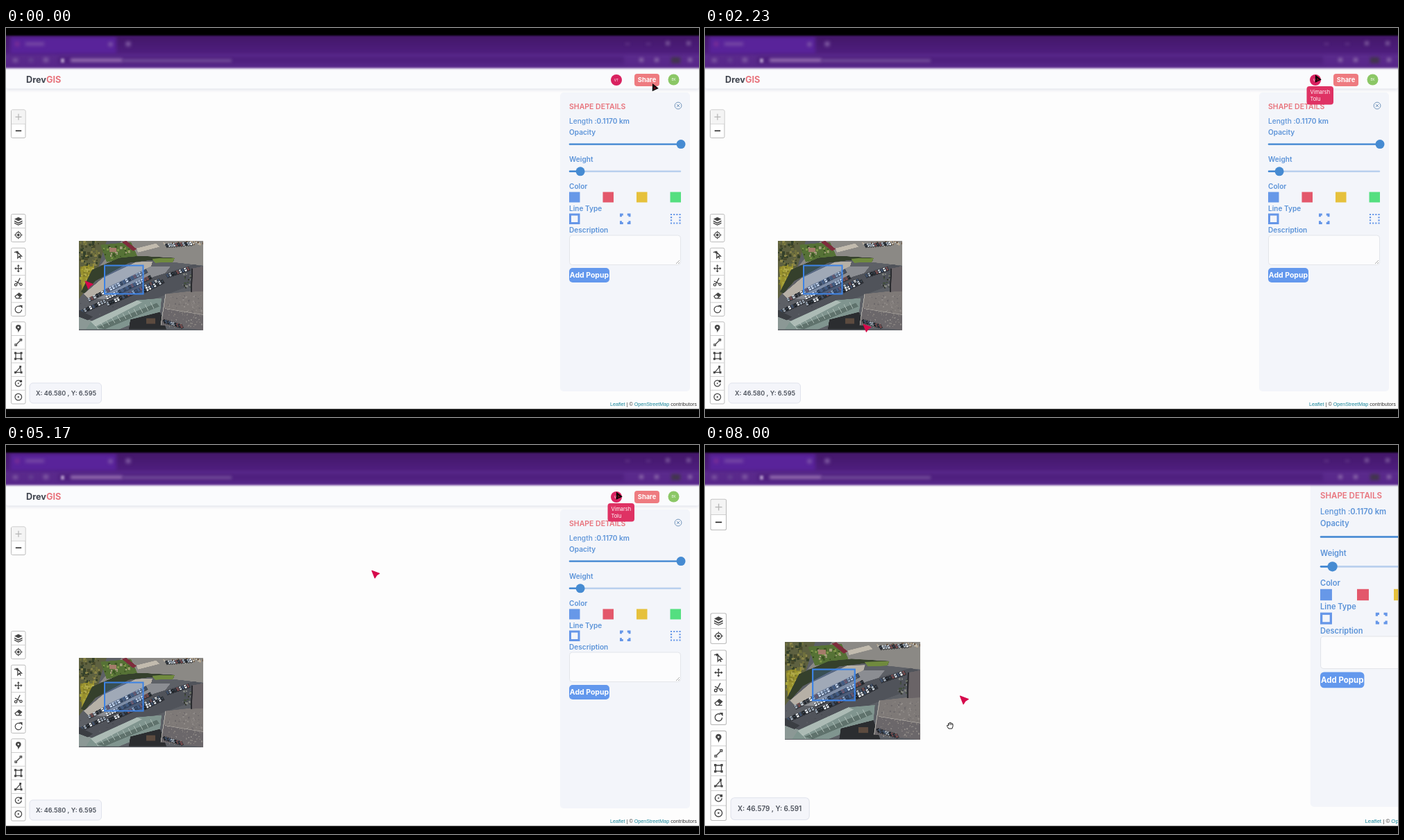
Recreate the animation shown at these times as an HTML page with a canvas. Size 998 px wide and 561 px high, loop 8.03 s.

```html
<!DOCTYPE html>
<html lang="en">
<head>
<meta charset="utf-8">
<title>Shared map</title>
<style>
html, body { margin: 0; width: 100%; height: 100%; overflow: hidden; background: #000; }
canvas { display: block; width: 998px; height: 561px; }
</style>
</head>
<body>
<canvas id="stage" width="998" height="561"></canvas>
<script>
const W = 998, H = 561, LOOP = 8030;
const ZOOM_AT = 6850, ZOOM = 1.0925, ZOOM_Y = -50.6;
const SANS = 'Inter, sans-serif', ARIAL = '"Liberation Sans", Arial, sans-serif';
const BLUE = '#5b93d8', ICON = '#464646';
const ctx = document.getElementById('stage').getContext('2d');

// time, x, y in page units
const remotePath = [
  [0, 119, 370], [1530, 321, 392], [2930, 171, 440], [4230, 568, 209],
  [6200, 409, 229], [7100, 332.5, 404], [8030, 341.5, 381.5]
];
// time, x, y of the pointer tip on the stage
const localPath = [
  [0, 931, 80], [250, 931, 80], [800, 879, 67.5], [5350, 879, 67.5],
  [5900, 913, 140.5], [7200, 913, 140.5], [7850, 353, 404.5], [8030, 353, 404.5]
];

function box(g, x, y, w, h, r, fill, stroke) {
  g.beginPath();
  g.roundRect(x, y, w, h, r);
  if (fill) { g.fillStyle = fill; g.fill(); }
  if (stroke) { g.strokeStyle = stroke; g.lineWidth = 1; g.stroke(); }
}
function disc(g, x, y, r, fill) {
  g.beginPath();
  g.arc(x, y, r, 0, Math.PI * 2);
  g.fillStyle = fill;
  g.fill();
}
function poly(g, fill, ...p) {
  g.beginPath();
  for (let i = 0; i < p.length; i += 2) g.lineTo(p[i], p[i + 1]);
  g.closePath();
  g.fillStyle = fill;
  g.fill();
}
function line(g, x1, y1, x2, y2, color, width) {
  g.beginPath();
  g.moveTo(x1, y1);
  g.lineTo(x2, y2);
  g.strokeStyle = color;
  g.lineWidth = width;
  g.stroke();
}
function text(str, x, y, size, weight, color, family = SANS, align = 'left') {
  ctx.font = `${weight} ${size}px ${family}`;
  ctx.textAlign = align;
  ctx.textBaseline = 'alphabetic';
  ctx.fillStyle = color;
  ctx.fillText(str, x, y);
  return x + ctx.measureText(str).width;
}
function layer(w, h, scale, paint) {
  const c = document.createElement('canvas');
  c.width = w * scale;
  c.height = h * scale;
  const g = c.getContext('2d');
  g.scale(scale, scale);
  paint(g);
  return c;
}
function random(seed) {
  return () => (seed = (seed * 16807) % 2147483647) / 2147483647;
}

// blurred browser bar
const bar = layer(W, 70, 1, g => {
  const rect = (x, y, w, h, c, blur) => {
    g.filter = `blur(${blur}px)`;
    g.fillStyle = c;
    g.fillRect(x, y, w, h);
  };
  const shade = g.createLinearGradient(0, 11, 0, 58);
  shade.addColorStop(0, '#431769');
  shade.addColorStop(.5, '#4d1d7c');
  shade.addColorStop(.62, '#5a2a8c');
  shade.addColorStop(1, '#572689');
  rect(-20, 0, W + 40, 58, shade, 1.6);
  rect(6, 13, 153, 24, '#59239a', 2.5);
  rect(75, 41, 815, 11, '#4f207f', 2.5);
  const soft = '#8d6aae';
  rect(28, 21, 27, 4, '#7d52a8', 2.5);
  rect(13, 20, 6, 6, '#7d3096', 2.5);
  rect(148, 21, 5, 5, soft, 2.5);
  rect(173, 20, 6, 6, soft, 2.5);
  rect(10, 44, 7, 5, '#8460a6', 2.5);
  rect(33, 44, 6, 5, '#6a4695', 2.5);
  rect(54, 43, 7, 6, '#8460a6', 2.5);
  rect(79, 44, 5, 6, '#ac90c4', 1.8);
  rect(93, 44, 75, 5, '#946fb0', 2.3);
  rect(168, 45, 157, 4, '#75509a', 2.3);
  for (const x of [892, 922]) rect(x, 22, 6, 2, '#6b4590', 2);
  for (const x of [950, 980]) rect(x, 19, 6, 6, '#785499', 2.3);
  for (const x of [912, 934, 982]) rect(x, 43, 6, 6, '#8763a6', 2.3);
  rect(958, 42, 13, 9, '#42354e', 2.3);
  rect(-20, -20, W + 40, 31, '#000', 1);
});

// aerial view, 179 by 129 units
const aerial = layer(179, 129, 3, g => {
  const rnd = random(77);
  const speck = (n, x, y, w, h, colors, size) => {
    for (let i = 0; i < n; i++) {
      g.fillStyle = colors[Math.floor(rnd() * colors.length)];
      const s = size * (.5 + rnd());
      g.fillRect(x + rnd() * w, y + rnd() * h, s, s);
    }
  };
  const cars = (x1, y1, x2, y2, n) => {
    const tones = ['#eef1f4', '#2b2f36', '#a3adb8', '#40506a', '#ccd3da', '#1d2126', '#7d4a4a'];
    for (let i = 0; i < n; i++) {
      const k = (i + .5) / n;
      g.save();
      g.translate(x1 + (x2 - x1) * k, y1 + (y2 - y1) * k);
      g.rotate(-.5);
      g.fillStyle = 'rgba(25,28,33,.6)';
      g.fillRect(-2, -2.6, 4.1, 6.2);
      g.fillStyle = tones[Math.floor(rnd() * tones.length)];
      g.fillRect(-1.5, -2.6, 2.8, 5);
      g.fillStyle = '#465361';
      g.fillRect(-1, -1, 1.9, 1.2);
      g.restore();
    }
  };
  g.fillStyle = '#5d6066';
  g.fillRect(0, 0, 179, 129);
  poly(g, '#8b8985', 62, 0, 179, 0, 179, 36, 135, 31, 90, 25, 30, 36);
  poly(g, '#5e6140', 0, 0, 40, 0, 28, 38, 14, 66, 0, 84);
  poly(g, '#9a922e', 2, 38, 24, 32, 16, 55, 4, 72);
  speck(60, 0, 0, 29, 33, ['#34402a', '#6f703d', '#8b8548', '#484a2c'], 3.2);
  speck(45, 1, 36, 17, 27, ['#a6a33a', '#837d2a', '#b3ab4c'], 2.8);
  poly(g, '#567236', 31, 6, 75, 2, 84, 22, 40, 31);
  speck(35, 34, 7, 40, 17, ['#3d5425', '#7f9548', '#a89f80', '#34461f'], 2.5);
  box(g, 44, 10, 10, 6, 0, '#a47c6a');
  poly(g, '#7e2c3c', 62, 2, 68, 0, 83, 12, 78, 15);
  poly(g, '#c2bbae', 83, 11, 111, 4, 116, 9, 85, 17);
  speck(22, 120, 0, 58, 5, ['#b3a48f', '#6d5a48', '#57613f', '#c9c2b4'], 2.6);
  poly(g, '#35402c', 19, 42, 58, 25, 88, 22, 138, 25, 136, 30, 104, 28, 72, 32, 24, 58, 8, 76, 3, 74);
  poly(g, '#708a3e', 105, 26, 138, 25, 135, 31, 110, 32);
  poly(g, '#b6b0a6', 7, 77, 34, 54, 82, 31, 106, 30, 104, 37, 44, 66, 14, 84);
  poly(g, '#8b8d92', 14, 84, 44, 66, 104, 37, 132, 37, 121, 51, 50, 84, 30, 84);
  poly(g, '#50535a', 0, 104, 108, 52, 166, 34, 179, 38, 179, 58, 93, 90, 0, 128);
  speck(90, 0, 90, 118, 30, ['#5a5d63', '#474a50'], 1.4);
  cars(13, 86, 98, 43, 22);
  cars(39, 83, 104, 52, 18);
  cars(40, 92, 117, 57, 21);
  cars(126, 51, 159, 40, 9);
  cars(3, 103, 39, 87, 9);
  cars(93, 73, 122, 58, 8);
  cars(125, 7, 163, 4, 11);
  poly(g, '#8b9895', 0, 109, 22, 117, 18, 128, 0, 128);
  poly(g, '#3b3e43', 0, 100, 20, 110, 13, 115, 0, 110);
  poly(g, '#80958f', 10, 128, 18, 116, 84, 86, 119, 83, 117, 104, 58, 128);
  poly(g, '#acbbb5', 17, 117, 84, 86, 91, 89, 24, 124);
  poly(g, '#5f726c', 26, 125, 112, 90, 116, 95, 37, 128);
  for (let i = 0; i < 11; i++) line(g, 23 + i * 8, 121 - i * 3.2, 28 + i * 8, 128 - i * 3, '#b8c6bf', .7);
  poly(g, '#2b2d30', 74, 114, 117, 103, 126, 128, 72, 128);
  box(g, 97, 112, 13, 8, 0, '#5c4b3f');
  poly(g, '#7e7977', 125, 77, 179, 71, 179, 129, 118, 122);
  poly(g, '#6b676a', 122, 97, 179, 107, 179, 129, 118, 122);
  speck(180, 126, 78, 51, 46, ['#918c89', '#6c686a', '#837e7b'], 1.4);
  line(g, 124, 98, 179, 107, '#a5a09b', .8);
  line(g, 125, 77, 118, 122, '#b2afa9', 1);
  cars(122, 116, 149, 124, 10);
  poly(g, '#6a6467', 163, 40, 179, 37, 179, 73, 162, 74);
  line(g, 163, 40, 162, 74, '#292a2e', 2);
  speck(25, 149, 47, 12, 20, ['#434f3e', '#80837e', '#33372f'], 2);
});

const icons = {
  layers: ['', 'M0-6L6-3L0 0L-6-3ZM-6-1L0 2L6-1L6 .8L0 3.8L-6 .8ZM-6 2.2L0 5L6 2.2L6 3.6L0 6.4L-6 3.6Z'],
  locate: ['M4 0A4 4 0 1 1-4 0A4 4 0 1 1 4 0M0-6V-4M0 6V4M-6 0H-4M6 0H4', 'M2 0A2 2 0 1 1-2 0A2 2 0 1 1 2 0'],
  edit: ['M-6-3.6Q-1-6-.5-1M-1-4V5L1.5 2.2H5ZM2 2.5L3.5 5.8', 'M-3.5-5.6H-.3V-2.4H-3.5Z'],
  move: ['M-5 0H5M0-5V5', 'M-6 0L-3.5-2V2ZM6 0L3.5-2V2ZM0-6L-2-3.5H2ZM0 6L-2 3.5H2Z'],
  cut: ['M-2 2.5L2.5-6M2.3 2.5L-5-1.5M-2 4A1.8 1.8 0 1 1-5.6 4A1.8 1.8 0 1 1-2 4M5.6 3.5A1.7 1.7 0 1 1 2.2 3.5A1.7 1.7 0 1 1 5.6 3.5', ''],
  erase: ['M-5 1L1-4L5-1L0 4H-3ZM0 4H5', 'M-2-1L1-4L5-1L2 2Z'],
  turn: ['M2.5-4A4.9 4.9 0 1 0 5 .5', 'M1-6.2H6V-1.2Z'],
  pin: ['', 'M0 6C-1-1-4 1-4-2A4 4 0 1 1 4-2C4 1 1 2 0 6ZM1.3-2A1.3 1.3 0 1 0-1.3-2A1.3 1.3 0 1 0 1.3-2Z'],
  line: ['M-3 3L3-3M-5 2.5H-2.5V5H-5ZM2.5-5H5V-2.5H2.5Z', ''],
  rect: ['M-4-4H4V4H-4Z', 'M-6-6H-2.8V-2.8H-6ZM6-6H2.8V-2.8H6ZM-6 6H-2.8V2.8H-6ZM6 6H2.8V2.8H6Z'],
  poly: ['M-4 4L3-4L4 4Z', 'M-6 2.6H-3V5.6H-6ZM1.5-6H4.5V-3H1.5ZM3 2.6H6V5.6H3Z'],
  ring: ['M3.5-3A4.6 4.6 0 1 0 4.6 0', 'M2-5H5.5V-1.5H2ZM1 0A1 1 0 1 0-1 0A1 1 0 1 0 1 0'],
  circle: ['M5 0A5 5 0 1 1-5 0A5 5 0 1 1 5 0', 'M1.2 0A1.2 1.2 0 1 1-1.2 0A1.2 1.2 0 1 1 1.2 0']
};
for (const k in icons) icons[k] = icons[k].map(d => new Path2D(d));

function icon(name, x, y) {
  const [stroke, fill] = icons[name];
  ctx.save();
  ctx.translate(x, y);
  ctx.scale(.96, .96);
  ctx.strokeStyle = ctx.fillStyle = ICON;
  ctx.lineWidth = 1.3;
  ctx.stroke(stroke);
  ctx.fill(fill, 'evenodd');
  ctx.restore();
}

function tools(y, h, names) {
  box(ctx, 7.5, y, 20.5, h, 2, '#fff', '#bcbcbc');
  const step = h / names.length;
  names.forEach((n, i) => {
    if (i) line(ctx, 8, y + step * i, 27.5, y + step * i, '#cfcfcf', 1);
    if (icons[n]) icon(n, 17.8, y + step * (i + .5));
  });
}

function slider(y, value) {
  const x = 811 + 161 * value;
  ctx.lineCap = 'round';
  line(ctx, 812, y, 971, y, '#b9d0ee', 2.4);
  line(ctx, 812, y, x, y, '#4589d3', 2.4);
  ctx.lineCap = 'butt';
  disc(ctx, x, y, 6.5, '#468bd2');
}

function frameIcon(x, dash, offset) {
  ctx.save();
  ctx.setLineDash(dash);
  ctx.lineDashOffset = offset;
  ctx.strokeStyle = '#6596e8';
  ctx.lineWidth = dash.length && dash[0] < 3 ? 2.2 : 3;
  ctx.strokeRect(x + 1.5, 269, 12.5, 12.5);
  ctx.restore();
}

function panel() {
  box(ctx, 798, 93, 187, 431, 5, '#f3f5fa');
  text('SHAPE DETAILS', 811, 117, 10.5, 600, '#e8737c');
  ctx.beginPath();
  ctx.arc(968, 112, 4.9, 0, 7);
  ctx.strokeStyle = '#7698bd';
  ctx.lineWidth = 1;
  ctx.stroke();
  line(ctx, 966, 110, 970, 114, '#7698bd', 1);
  line(ctx, 970, 110, 966, 114, '#7698bd', 1);
  const x = text('Length :', 811, 138, 10.2, 500, BLUE);
  text('0.1170 km', x, 138, 10.2, 600, BLUE);
  const labels = [['Opacity', 153.5], ['Weight', 193], ['Color', 232], ['Line Type', 263.5], ['Description', 295]];
  for (const [s, y] of labels) text(s, 811, y, 10.1, 600, BLUE);
  slider(167.6, 1);
  slider(206.8, .1);
  ['#6798e8', '#e3586b', '#e6c13c', '#54df80'].forEach((c, i) => {
    ctx.fillStyle = c;
    ctx.fillRect(811 + i * 48.5, 236.5, 15.5, 15);
  });
  frameIcon(811, [], 0);
  frameIcon(884, [6.5, 6], 3.25);
  frameIcon(956.5, [2.1, 2.07], 1.05);
  box(ctx, 811.5, 299, 160, 42.5, 4, '#fcfcfd', '#e3e5ea');
  line(ctx, 965, 340, 970, 335, '#999', .8);
  line(ctx, 968, 340, 970, 338, '#999', .8);
  box(ctx, 811, 346, 58, 21, 5, '#6398ed');
  text('Add Popup', 840, 360.2, 10.5, 700, '#fff', SANS, 'center');
}

function header(hover) {
  ctx.save();
  ctx.shadowColor = 'rgba(80,90,150,.22)';
  ctx.shadowBlur = 5;
  ctx.shadowOffsetY = 1;
  box(ctx, 0, 50, W, 37.5, 3, '#fafbfd');
  ctx.restore();
  const x = text('Drev', 29, 79, 12.7, 700, '#40454f');
  text('GIS', x, 79, 12.7, 700, '#e8737c');
  disc(ctx, 879, 75, 8, '#d92260');
  text('VT', 879, 76.8, 4.8, 400, '#fff', SANS, 'center');
  box(ctx, 905, 66, 36, 18, 4, '#ee7b80');
  text('Share', 923, 78.2, 9.3, 700, '#fff', SANS, 'center');
  disc(ctx, 961.5, 74.5, 8, '#8bc766');
  text('EK', 961.5, 76.3, 4.8, 400, '#fff', SANS, 'center');
  if (hover) {
    box(ctx, 866.5, 84, 38.5, 26.5, 4, '#df3264');
    text('Vimarsh', 871.5, 95, 7.4, 400, '#fff');
    text('Tolu', 871.5, 105.2, 7.4, 400, '#fff');
  }
}

function page(hover, coords) {
  ctx.fillStyle = '#fdfdfd';
  ctx.fillRect(0, 0, W, H);
  ctx.drawImage(aerial, 105, 306.7, 179, 128.8);
  ctx.fillStyle = 'rgba(70,140,250,.2)';
  ctx.fillRect(142, 342.5, 55.5, 41);
  ctx.strokeStyle = '#3c83e6';
  ctx.lineWidth = 2;
  ctx.strokeRect(142, 342.5, 55.5, 41);

  tools(118, 40.5, ['plus', 'minus']);
  ctx.fillStyle = '#f4f4f4';
  ctx.fillRect(8, 118.5, 19.5, 19.2);
  line(ctx, 13.5, 128.3, 22.5, 128.3, '#b8b8b8', 1.3);
  line(ctx, 18, 123.8, 18, 132.8, '#b8b8b8', 1.3);
  line(ctx, 13.8, 148.3, 22.2, 148.3, '#222', 1.5);
  tools(268.5, 40, ['layers', 'locate']);
  tools(317.3, 98.2, ['edit', 'move', 'cut', 'erase', 'turn']);
  tools(423.8, 118.2, ['pin', 'line', 'rect', 'poly', 'ring', 'circle']);

  box(ctx, 34, 512, 103.5, 29, 5, '#f4f5fa', '#e0e3ec');
  text(coords, 43, 529.8, 9.05, 600, '#4b505a');
  panel();
  let x = text('Leaflet', 870, 545.4, 7.18, 400, '#16859a', ARIAL);
  x = text(' | © ', x, 545.4, 7.18, 400, '#333', ARIAL);
  x = text('OpenStreetMap', x, 545.4, 7.18, 400, '#16859a', ARIAL);
  text(' contributors', x, 545.4, 7.18, 400, '#333', ARIAL);
  header(hover);
}

function segment(path, t) {
  let i = 0;
  while (i < path.length - 2 && t >= path[i + 1][0]) i++;
  return i;
}
function eased(path, t) {
  const i = segment(path, t), a = path[i], b = path[i + 1];
  const k = (t - a[0]) / (b[0] - a[0]), e = k * k * (3 - 2 * k);
  return [1, 2].map(n => a[n] + (b[n] - a[n]) * e);
}
function curved(path, t) {
  const i = segment(path, t), a = path[i], b = path[i + 1];
  const p = path[i - 1] || a, q = path[i + 2] || b;
  const d = b[0] - a[0], k = (t - a[0]) / d, k2 = k * k, k3 = k2 * k;
  return [1, 2].map(n => {
    const ma = (b[n] - p[n]) / (b[0] - p[0]) * d;
    const mb = (q[n] - a[n]) / (q[0] - a[0]) * d;
    return (2 * k3 - 3 * k2 + 1) * a[n] + (k3 - 2 * k2 + k) * ma + (3 * k2 - 2 * k3) * b[n] + (k3 - k2) * mb;
  });
}

function remotePointer([x, y]) {
  poly(ctx, '#d60a4c', x - 4.8, y - 4.6, x + 6, y - .5, x + 2, y + 2, x - .6, y + 6);
  ctx.strokeStyle = '#d60a4c';
  ctx.lineWidth = 1.2;
  ctx.lineJoin = 'round';
  ctx.stroke();
}

function arrow(x, y, tilted) {
  ctx.save();
  ctx.translate(x, y);
  if (tilted) ctx.rotate(-.44);
  poly(ctx, '#050505', 0, 0, 5, 10, -5, 10);
  poly(ctx, tilted ? '#650718' : '#159a8c', 0, 4.5, 2.5, 8.8, -2.5, 8.8);
  ctx.restore();
}

const palm = new Path2D('M-2.3 4.5L-4.5 .8Q-4.8-.8-3.2 0L-2.6.6V-2.7Q-1.8-4.2-1.1-2.8Q-.9-5 .3-4.2L.7-3.2Q1.8-4.6 2.3-2.6Q3.8-3.3 4-1.5V1.2L2.8 4.5Z');
const fingers = new Path2D('M-1.1-2.8V-.5M.7-3.2V-.5M2.3-2.6V-.4');
function hand(x, y) {
  ctx.save();
  ctx.translate(x, y);
  ctx.fillStyle = '#fff';
  ctx.strokeStyle = '#222';
  ctx.lineWidth = 1;
  ctx.lineJoin = 'round';
  ctx.fill(palm);
  ctx.stroke(palm);
  ctx.lineWidth = .7;
  ctx.stroke(fingers);
  ctx.restore();
}

function draw(t) {
  const zoomed = t >= ZOOM_AT;
  const [x, y] = eased(localPath, t);
  const onMap = zoomed && x < 872;
  const hover = Math.hypot(x - 879, y - 71) < 9;
  const k = onMap ? (872 - x) / 519 : 0;
  const coords = `X: ${(46.58 - .001 * k).toFixed(3)} , Y: ${(6.595 - .004 * k).toFixed(3)}`;

  ctx.fillStyle = '#fdfdfd';
  ctx.fillRect(0, 0, W, H);
  ctx.save();
  ctx.beginPath();
  ctx.rect(0, 54, W, 496);
  ctx.clip();
  if (zoomed) {
    ctx.translate(0, ZOOM_Y);
    ctx.scale(ZOOM, ZOOM);
  }
  page(hover, coords);
  remotePointer(curved(remotePath, t));
  ctx.restore();

  ctx.drawImage(bar, 0, 0);
  ctx.fillStyle = '#000';
  ctx.fillRect(0, 549.4, W, 12);
  if (onMap) hand(x, y);
  else arrow(x, y, y < 90);
}

function tick(now) {
  draw(now % LOOP);
  requestAnimationFrame(tick);
}
draw(0);
requestAnimationFrame(tick);
</script>
</body>
</html>
```
